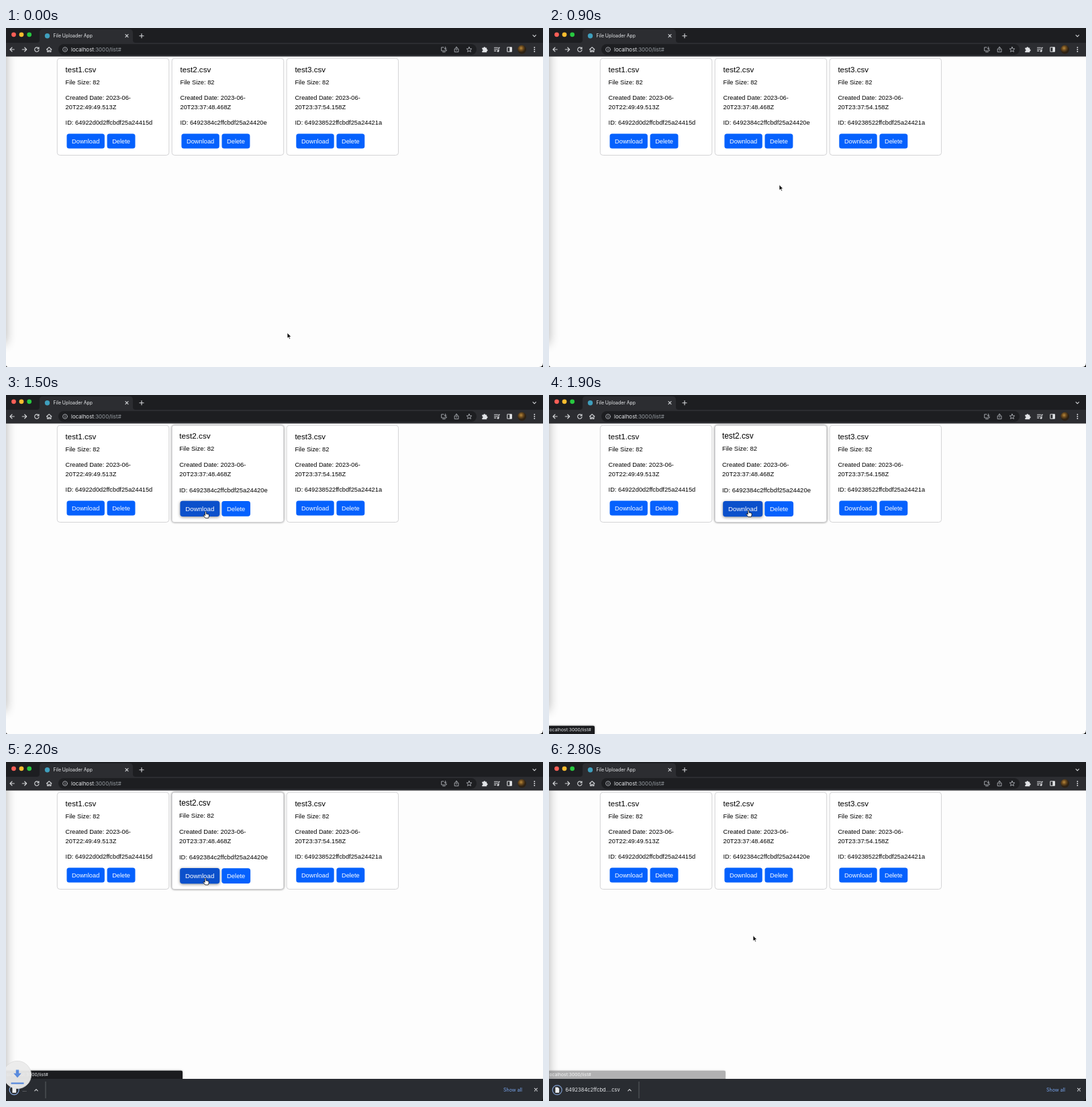
An HTML page that plays this animation: 800 px wide and 505 px high, repeating every 2900 ms.

```html
<!DOCTYPE html>
<html lang="en">
<head>
<meta charset="utf-8">
<title>File Uploader App</title>
<style>
  html, body { margin: 0; width: 100%; height: 100%; overflow: hidden; background: #fdfdfd; }
  svg { display: block; width: 800px; height: 505px; }
  text { white-space: pre; }
  .ui { font-family: Inter, Roboto, sans-serif; fill: #e8eaed; }
  .page { font-family: "Liberation Sans", Arial, sans-serif; font-size: 9.28px; fill: #000; }
  .line { fill: none; stroke: #d5d7da; stroke-width: 1.1; stroke-linecap: round; stroke-linejoin: round; }
</style>
</head>
<body>
<svg viewBox="0 0 800 505">
  <defs>
    <filter id="soft" x="-200%" y="-20%" width="500%" height="140%"><feGaussianBlur stdDeviation="8"/></filter>
    <radialGradient id="photo" cx=".4" cy=".35">
      <stop offset="0" stop-color="#b88a3c"/><stop offset=".5" stop-color="#6b4a1e"/><stop offset="1" stop-color="#2c2114"/>
    </radialGradient>
  </defs>

  <rect width="800" height="505" fill="#fdfdfd"/>
  <rect x="-20" y="20" width="20" height="450" fill="#000" opacity=".3" filter="url(#soft)"/>
  <g id="cards" class="page"></g>

  <!-- browser frame -->
  <rect width="800" height="23" fill="#1d1e21"/>
  <path d="M46 22q4 0 4-4V7q0-5 5-5H184q5 0 5 5V18q0 4 4 4H800V42.5H0V22z" fill="#2c2d31"/>
  <rect x="78" y="24" width="623" height="16" rx="8" fill="#1d1e21"/>
  <circle cx="11.5" cy="9.8" r="3.4" fill="#fe5f57"/>
  <circle cx="23" cy="9.8" r="3.4" fill="#febc2e"/>
  <circle cx="34.7" cy="9.8" r="3.4" fill="#28c840"/>
  <circle cx="61.5" cy="11.7" r="3.7" fill="#3f9fbd"/>
  <g class="ui">
    <text x="70.5" y="14.2" font-size="6.9">File Uploader App</text>
    <text x="97" y="34.9" font-size="7.95">localhost<tspan fill="#9aa0a6">:3000/list#</tspan></text>
  </g>
  <g class="line">
    <path d="M178 9.6l4 4m0-4l-4 4M202 8.6v6.2m-3.1-3.1h6.2M785 10.6l2.2 2.2 2.2-2.2"/>
    <path d="M12.3 32H6m3-3l-3 3 3 3M24.2 32h6.5m-3-3l3 3-3 3"/>
    <path d="M48.6 30.4a3.2 3.2 0 1 0 .4 2.4M49 28.7v2.3h-2.4"/>
    <path d="M60.5 32l3.7-3.4 3.7 3.4M61.6 31.5v4h1.8v-2.3h1.7v2.3h1.8v-4"/>
    <g stroke-width=".9" stroke="#aeb2b7">
      <circle cx="88" cy="32" r="3.4"/><path d="M88 31.6v2M88 30.2v.1"/>
      <path d="M652 28.8h-3.3v5.2h7.4v-1.6M650.6 35.8h3.6M654.6 28.2v3.6m-1.6-1.5l1.6 1.5 1.6-1.5"/>
      <path d="M669.6 31h-1.4v4.7h5.8V31h-1.4M671.1 33.4v-5.2m-1.5 1.4l1.5-1.4 1.5 1.4"/>
      <path d="M690 28.3l1.1 2.5 2.7.2-2.1 1.8.7 2.7-2.4-1.4-2.4 1.4.7-2.7-2.1-1.8 2.7-.2z"/>
    </g>
    <path d="M727.5 29.3h5m-5 2.4h5m-5 2.4h2.5M734 34.3v-5h1.5"/>
    <rect x="746.8" y="28.7" width="6.6" height="6.6" rx=".5"/>
  </g>
  <g fill="#e2e4e7">
    <path d="M709.3 29.6h2.1a1.4 1.4 0 0 1 2.8 0h2v2.2a1.4 1.4 0 0 1 0 2.8v1.6h-6.9v-2a1.2 1.2 0 0 0 0-2.4z"/>
    <circle cx="733" cy="34.4" r="1.3"/>
    <rect x="750.3" y="28.7" width="3.1" height="6.6"/>
    <circle cx="787.3" cy="29" r=".9"/><circle cx="787.3" cy="32" r=".9"/><circle cx="787.3" cy="35" r=".9"/>
  </g>
  <circle cx="768.6" cy="32" r="6.4" fill="url(#photo)"/>

  <!-- link status -->
  <g id="status" class="ui">
    <path id="bubble" fill="#1b1c1f" style="filter:drop-shadow(0 0 1.5px #0006)"/>
    <text x="-1.2" y="-3.7" font-size="6.8">localhost:3000/list#</text>
  </g>

  <!-- download shelf, origin at its top edge -->
  <g id="shelf">
    <rect width="800" height="34" fill="#292c31"/>
    <path d="M9.4 12.4h3.6l2.2 2.2v6.2H9.4z" fill="#eceef0"/>
    <circle id="ring" cx="12.2" cy="16.6" r="7" fill="none" stroke="#8fb2ea" stroke-width="1.2"/>
    <text id="name" class="ui" x="24.4" y="19.3" font-size="7.5"></text>
    <g id="tail">
      <path class="line" d="M-16.2 17.8l2.2-2.2 2.2 2.2"/>
      <path d="M0 4V29" stroke="#5b5e63"/>
    </g>
    <text class="ui" x="741" y="18.6" font-size="7.1" style="fill:#78a5ee">Show all</text>
    <path class="line" d="M787.4 14.2l4 4m0-4l-4 4"/>
  </g>
  <g id="badge">
    <circle r="20.6" fill="#ececec" stroke="#d8d8d8" stroke-width=".8"/>
    <path d="M-2.2-7.5h4.4v5.2h3.6L0 4.2-5.8-2.3h3.6zM-9.5 11.5h19v2.2h-19z" fill="#5b8ee6"/>
  </g>
  <path d="M800 499v6h-6q6 0 6-6zM0 502v3h3q-3 0-3-3z" fill="#111"/>

  <g id="pointer" stroke="#fff" stroke-width=".8" stroke-linejoin="round">
    <path id="arrow" d="M0 0V8.3l1.9-1.7 1.2 2.8 1.4-.6-1.2-2.7h2.6z" fill="#000"/>
    <path id="hand" d="M-.8.8q.9-1.4 1.8 0v3l1.4.1 1.4.4 1.3.6v2.6L4.2 10H-.2L-3 6.6q-.3-1.4.9-1.2l1.3 1z" fill="#fff" stroke="#000" stroke-width=".75"/>
  </g>
</svg>
<script>
const $ = id => document.getElementById(id);
const move = (el, x, y) => el.setAttribute('transform', `translate(${x} ${y})`);
const LOOP = 2900, STEP = 100, SHELF = 33;

const files = [
  ['test1.csv', '20T22:49:49.513Z', '64922d0d2ffcbdf25a24415d'],
  ['test2.csv', '20T23:37:48.468Z', '6492384c2ffcbdf25a24420e'],
  ['test3.csv', '20T23:37:54.158Z', '649238522ffcbdf25a24421a'],
];

const button = (x, w, label) => `<g class="btn">
  <rect x="${x}" y="112.4" width="${w}" height="22.2" rx="3.6" fill="#0561fd"/>
  <text x="${x + w / 2}" y="126.7" text-anchor="middle" fill="#fff">${label}</text></g>`;

$('cards').innerHTML = files.map(([name, time, id], i) => `
  <g transform="translate(${76 + 170.9 * i} 45)">
    <rect class="frame" x=".3" y=".2" width="166.5" height="144.3" rx="4" fill="#fff" stroke="#cfcfd1" stroke-width=".9"/>
    <g class="body">
      <text x="12.6" y="21" font-size="11.6">${name}</text>
      <text x="12.6" y="38.9">File Size: 82</text>
      <text x="12.6" y="62.2">Created Date: 2023-06-</text>
      <text x="12.6" y="76.1">${time}</text>
      <text x="12.6" y="99.3">ID: ${id}</text>
      ${button(14.5, 56.4, 'Download')}${button(74.6, 41.9, 'Delete')}
    </g>
  </g>`).join('');

const card = $('cards').children[1];
const frame = card.querySelector('.frame'), body = card.querySelector('.body');
const download = card.querySelector('.btn');

// piecewise linear value at time t; keys are [time, value]
function at(t, ...keys) {
  if (t <= keys[0][0]) return keys[0][1];
  for (let i = 1; i < keys.length; i++) {
    const [t0, a] = keys[i - 1], [t1, b] = keys[i];
    if (t < t1) return a + (b - a) * (t - t0) / (t1 - t0);
  }
  return keys[keys.length - 1][1];
}

const scale = (el, s, x, y) =>
  el.setAttribute('transform', `translate(${x} ${y}) scale(${s}) translate(${-x} ${-y})`);
const mix = (a, b, k) => `rgb(${a.map((v, i) => Math.round(v + (b[i] - v) * k))})`;

function drawCard(t) {
  const k = at(t, [1200, 0], [1300, .45], [1600, 1], [2300, 1], [2500, 0]);
  const press = at(t, [1250, 0], [1300, .1], [1500, 1], [2300, 1], [2450, 0]);
  scale(body, 1 + .022 * k, 83.5, 72.2);
  scale(download, 1 + .025 * press, 42.7, 123.5);
  frame.style.filter = k ? `drop-shadow(0 .5px 1.6px rgba(0,0,0,${.55 * k}))` : '';
  const rect = download.firstElementChild;
  rect.setAttribute('fill', mix([5, 97, 253], [11, 80, 203], press));
  rect.style.filter = press ? `drop-shadow(0 1px 2px rgba(0,0,0,${.45 * press}))` : '';
}

function drawPointer(t) {
  const x = at(t, [200, 419], [800, 351], [900, 343], [1300, 298], [1600, 297], [2300, 297], [2600, 301], [2800, 304]);
  const y = at(t, [200, 454], [800, 261], [900, 233.5], [1300, 177], [1600, 171.5], [1900, 171.5],
    [2200, 173], [2300, 177], [2600, 244], [2800, 258.5]);
  const linked = t >= 1300 && t < 2400;
  move($('pointer'), x, y);
  $('hand').style.display = linked ? '' : 'none';
  $('arrow').style.display = linked ? 'none' : '';
}

function drawDownload(t) {
  const top = 505 - SHELF * at(t, [1950, 0], [2150, 1]);
  const width = at(t, [2000, 68], [2100, 263]);
  move($('status'), 0, top);
  $('status').style.opacity = at(t, [1600, 0], [1800, 1], [2600, 1], [2900, 0]);
  $('bubble').setAttribute('d', `M0-12.2H${width - 2}q2 0 2 2V0H0z`);

  const item = at(t, [2000, 52], [2200, 59], [2500, 120], [2600, 127], [2700, 134]);
  const shown = Math.round((item - 59) / 68 * 14);
  move($('shelf'), 0, top);
  move($('tail'), item, 0);
  $('name').textContent = item >= 134 ? '6492384c2ffcbd....csv'
    : shown > 0 ? '6492384c2ffcbd'.slice(0, shown) + '......' : '...';
  $('ring').style.opacity = at(t, [2300, 1], [2500, 0], [2600, 0], [2800, .85]);

  move($('badge'), 17, at(t, [2000, 446], [2400, 486]));
  $('badge').style.opacity = at(t, [1950, 0], [2150, .95], [2200, .95], [2400, 0]);
}

function draw() {
  const t = Math.floor(performance.now() % LOOP / STEP) * STEP;
  drawCard(t);
  drawPointer(t);
  drawDownload(t);
  requestAnimationFrame(draw);
}
draw();
</script>
</body>
</html>
```
